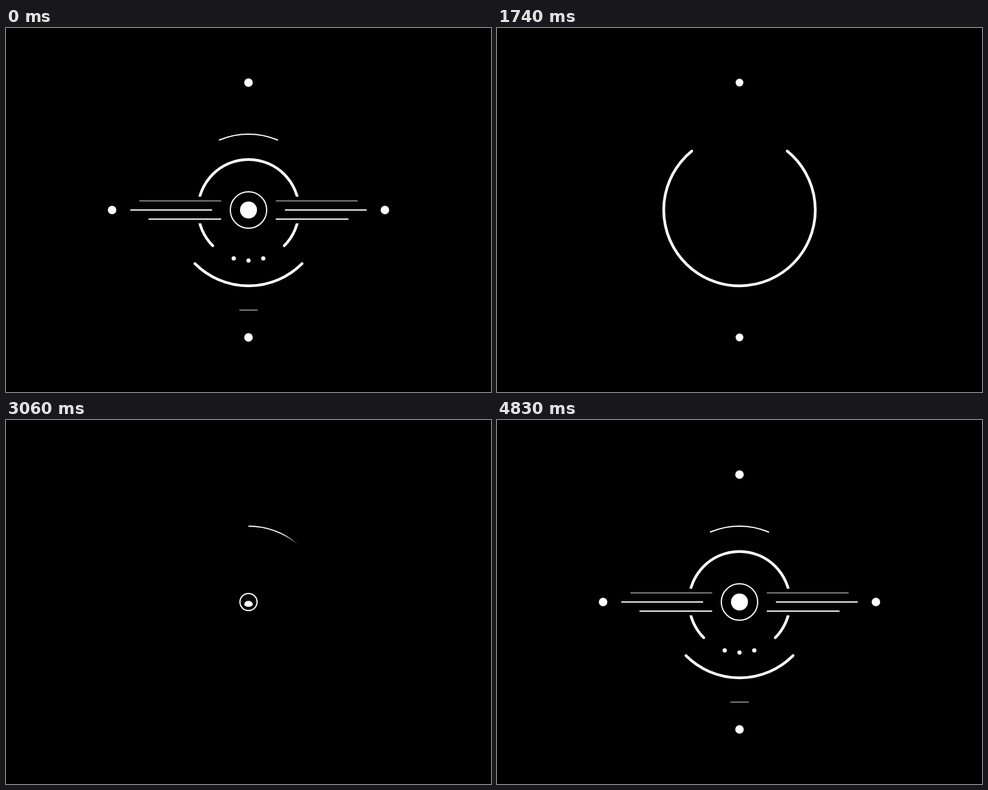
Animation of 800 by 600 pixels, one loop 4920 ms. Source, as an HTML page with a canvas:

```html
<!DOCTYPE html>
<html lang="en">
<head>
<meta charset="utf-8">
<title>Orbit loop</title>
<style>
  html, body { margin: 0; width: 100%; height: 100%; overflow: hidden; background: #000; }
  canvas { display: block; width: 800px; height: 600px; }
</style>
</head>
<body>
<canvas id="stage" width="800" height="600"></canvas>
<script>
const ctx = document.getElementById('stage').getContext('2d');
const LOOP = 4920, DARK = 2460, TAU = Math.PI * 2, RAD = Math.PI / 180;
const OUTER = 125, INNER = 250 / 3, THICK = 4.5, THIN = 2.2;
const CLEAR = 'rgba(255,255,255,0)';
let t = 0;

const clamp = v => Math.min(1, Math.max(0, v));
const lerp = (a, b, p) => a + (b - a) * p;
const span = (a, b) => clamp((t - a) / (b - a));
const quadIn = p => p * p;
const quadOut = p => 1 - (1 - p) ** 2;
const inOut = p => p < 0.5 ? 2 * p * p : 1 - 2 * (1 - p) ** 2;
const backIn = p => p * p * (2.7 * p - 1.7);

// 1 while present; leaves during a..b and comes back mirrored during c..d
const life = (a, b, c, d, ease = quadIn) =>
  1 - ease(t < DARK ? span(a, b) : 1 - span(c, d));

function disc(x, y, r) {
  if (r <= 0) return;
  ctx.beginPath();
  ctx.arc(x, y, r, 0, TAU);
  ctx.fill();
}

function arc(r, from, to, width, style = '#fff', cap = 'round') {
  if (r <= 0 || to <= from) return;
  ctx.lineWidth = width;
  ctx.strokeStyle = style;
  ctx.lineCap = cap;
  ctx.beginPath();
  ctx.arc(0, 0, r, from * RAD, to * RAD);
  ctx.stroke();
}

function line(x1, x2, y, width, style = '#fff') {
  ctx.lineWidth = width;
  ctx.strokeStyle = style;
  ctx.lineCap = 'butt';
  ctx.beginPath();
  ctx.moveTo(x1, y);
  ctx.lineTo(x2, y);
  ctx.stroke();
}

function fade(x1, y1, x2, y2) {
  const g = ctx.createLinearGradient(x1, y1, x2, y2);
  g.addColorStop(0, '#fff');
  g.addColorStop(1, CLEAR);
  return g;
}

function core() {
  if (t < DARK) {
    disc(0, 0, 14 * (1 - backIn(span(1230, 1560))));
    arc(30 * (1 - backIn(span(1270, 1600))), 0, 360, 2);
    return;
  }
  arc(30 * quadOut(span(2930, 3411)), 0, 360, 2);
  const r = 14 * quadOut(span(2970, 3280));
  const k = span(3060, 3280);
  if (!r) return;
  const y = lerp(4, 0, k);
  ctx.beginPath();
  ctx.ellipse(0, y, r, r * lerp(0.86, 1, k), 0, Math.PI, TAU);
  ctx.ellipse(0, y, r, r * lerp(0.57, 1, k), 0, 0, Math.PI);
  ctx.fill();
}

function innerRing() {
  const shown = life(1160, 1418, 3520, 3773);
  if (!shown) return;
  const edge = lerp(-92, 70, shown);
  const gap = t < DARK ? 22 : 22 * quadOut(span(3830, 3990));
  ctx.save();
  ctx.beginPath();
  ctx.rect(-100, -100, 200, 100 - gap);
  ctx.rect(-100, gap, 200, 100 - gap);
  ctx.clip();
  arc(INNER, 135, 405, THICK, fade(0, edge - 5, 0, edge + 5));
  ctx.restore();
}

function beam(y, far, near, width, shown) {
  if (!shown) return;
  const edge = far - shown * (far - near + 10);
  for (const side of [-1, 1])
    line(side * far, side * near, y, width, fade(side * (edge + 10), 0, side * edge, 0));
}

function smallDots() {
  const r = 3.5, swing = 17;
  const orbit = a => disc(INNER * Math.sin(a * RAD), INNER * Math.cos(a * RAD), r);
  if (t > DARK) {
    if (t < 3555) return;
    const open = swing * quadOut(span(3850, 4100));
    disc(0, INNER * quadOut(span(3550, 3814)), r);
    orbit(-open);
    orbit(open);
    return;
  }
  if (t < 225) orbit(lerp(-swing, swing, inOut(span(0, 225))));
  const hop = span(345, 885);
  if (hop < 1) {
    const a = swing * inOut(hop) * RAD;
    disc(INNER * Math.sin(a), INNER * Math.cos(a) - 120 * hop * (1 - hop), r);
  }
  const s = 1 - backIn(span(1380, 1530));
  disc(INNER * Math.sin(swing * RAD), INNER * Math.cos(swing * RAD), r * s);
}

function outerArcs() {
  const top = 22.5 * life(1480, 1640, 3720, 4020);
  arc(OUTER, -90 - top, -90 + top, THIN);
  const half = t < DARK
    ? lerp(45, 180, inOut(span(1400, 1950)))
    : 45 * quadOut(span(3800, 4110));
  const r = t < DARK ? OUTER * (1 - quadIn(span(1960, 2430))) : OUTER;
  arc(r, 90 - half, 90 + half, THICK);
}

function burst() {
  ctx.globalAlpha = 1 - span(2760, 3000);
  if (ctx.globalAlpha > 0) arc(OUTER * quadOut(span(2480, 2880)), 0, 360, THICK);
  ctx.globalAlpha = 1;
}

// thin circle drawn clockwise with a soft head, then wiped the same way
function sweep() {
  const head = 374 * inOut(span(2950, 3428));
  const tail = 374 * inOut(span(3160, 3600));
  if (!head || tail >= 360) return;
  const g = ctx.createConicGradient(-Math.PI / 2, 0, 0);
  g.addColorStop(0, '#fff');
  g.addColorStop(clamp((head - 14) / 360), '#fff');
  if (head < 360) g.addColorStop(head / 360, CLEAR);
  arc(OUTER, tail - 90, Math.min(head, 360) - 90, THIN, g, 'butt');
}

function draw() {
  ctx.setTransform(1, 0, 0, 1, 0, 0);
  ctx.fillStyle = '#000';
  ctx.fillRect(0, 0, 800, 600);
  ctx.translate(400, 300);
  ctx.fillStyle = '#fff';

  innerRing();
  outerArcs();
  if (t > DARK) {
    burst();
    sweep();
  }
  core();
  smallDots();

  beam(-15, 180, 45, 1, life(1273, 1488, 3880, 4100));
  beam(0, 195, 60, 2, life(1320, 1535, 3920, 4140));
  beam(15, 165, 45, 2, life(1260, 1470, 3840, 4060));

  const sides = 7 * life(1480, 1740, 3960, 4240, backIn);
  const poles = 7 * life(1560, 1820, 4200, 4480, backIn);
  for (const s of [-1, 1]) {
    disc(225 * s, 0, sides);
    disc(0, 210 * s, poles);
  }
  const dash = 15 * life(1380, 1520, 4650, 4835);
  if (dash) line(-dash, dash, 165, 1);
}

const start = performance.now();
function tick() {
  t = Math.max(0, performance.now() - start) % LOOP;
  draw();
  requestAnimationFrame(tick);
}
tick();
</script>
</body>
</html>
```
